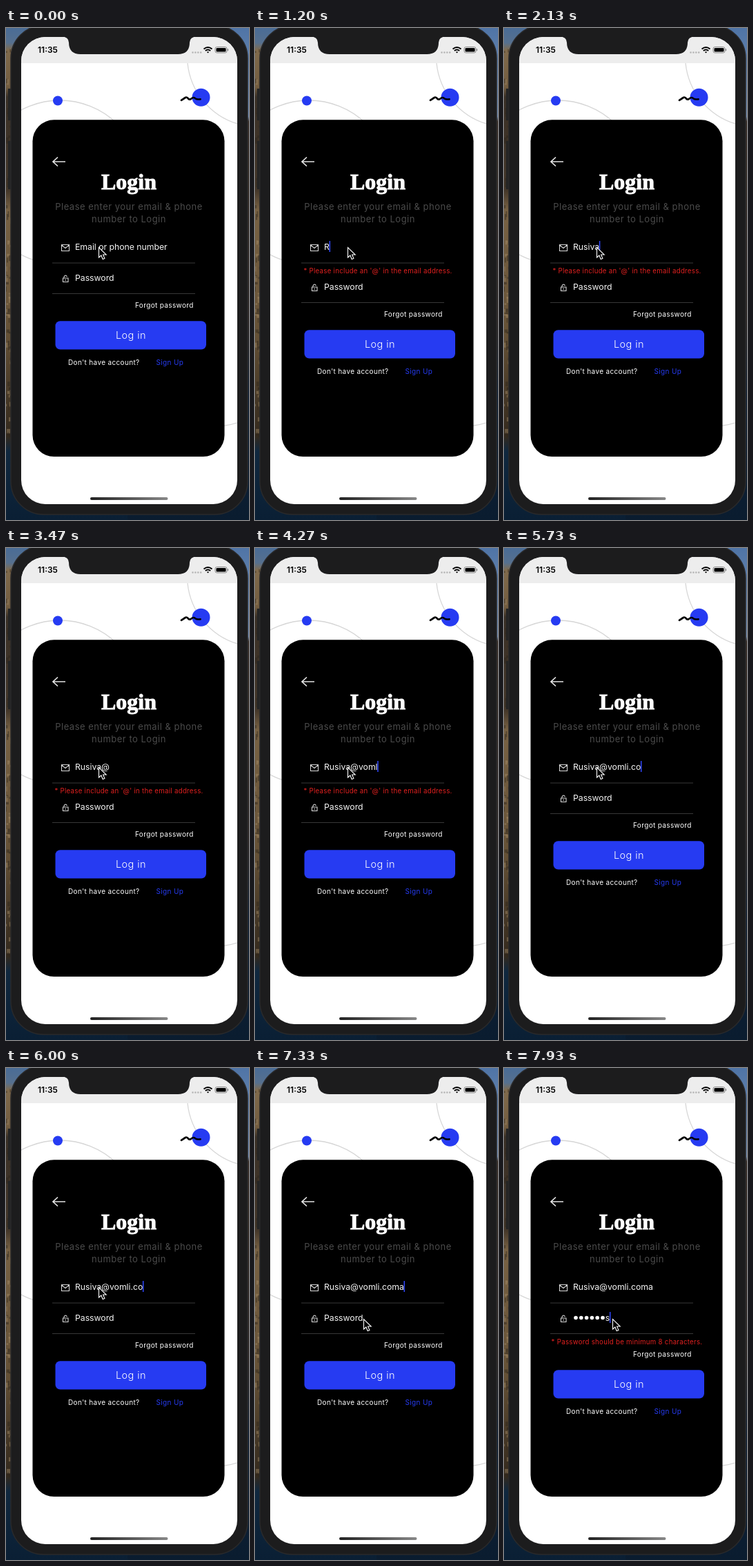
An HTML page for the animation above (8 s loop, 352 by 714 pixels).

```html
<!DOCTYPE html>
<html lang="en">
<head>
<meta charset="utf-8">
<title>Login form</title>
<style>
  html, body { margin: 0; width: 100%; height: 100%; overflow: hidden; background: #1c1c1d; }
  svg { display: block; width: 100vw; height: 100vh; }
  text { font-family: Inter, sans-serif; fill: #fff; white-space: pre; }
  .mid { text-anchor: middle; }
  .title { font: bold 32px "Liberation Serif", serif; stroke: #fff; stroke-width: .9; }
  .lead { font-size: 13px; letter-spacing: .5px; fill: #4b4b4b; }
  .field { font-size: 12.3px; letter-spacing: -.05px; fill: #f4f4f4; }
  .small { font-size: 10px; letter-spacing: .35px; }
  .error { font-size: 9.7px; letter-spacing: .27px; fill: #e0201f; }
  .button { font-size: 14.5px; font-weight: 300; letter-spacing: .4px; }
  .icon { fill: none; stroke: #d8d8d8; stroke-width: 1.1; }
  .rule { stroke: #383838; }
  .ring { fill: none; stroke: #d6d6d6; stroke-width: 1.3; }
</style>
</head>
<body>
<svg viewBox="0 0 352 714">
  <defs>
    <linearGradient id="cliff" x2="0" y2="1">
      <stop offset="0" stop-color="#4a6c96"/>
      <stop offset=".03" stop-color="#56708f"/>
      <stop offset=".045" stop-color="#806a4c"/>
      <stop offset=".12" stop-color="#735d40"/>
      <stop offset=".14" stop-color="#3a3026"/>
      <stop offset=".33" stop-color="#44372a"/>
      <stop offset=".37" stop-color="#786244"/>
      <stop offset=".62" stop-color="#655136"/>
      <stop offset=".83" stop-color="#33291d"/>
      <stop offset=".86" stop-color="#10283f"/>
      <stop offset="1" stop-color="#0a1f34"/>
    </linearGradient>
    <linearGradient id="shore" x2="0" y2="1">
      <stop offset="0" stop-color="#4f74a6"/>
      <stop offset=".18" stop-color="#7d97bb"/>
      <stop offset=".19" stop-color="#3f332b"/>
      <stop offset=".6" stop-color="#302a28"/>
      <stop offset=".75" stop-color="#10233a"/>
      <stop offset="1" stop-color="#0a1c2f"/>
    </linearGradient>
    <linearGradient id="bar">
      <stop offset="0" stop-color="#222"/>
      <stop offset="1" stop-color="#888"/>
    </linearGradient>
  </defs>

  <rect width="176" height="714" fill="url(#cliff)"/>
  <rect x="176" width="176" height="714" fill="url(#shore)"/>
  <g id="rocks"></g>

  <!-- phone -->
  <path d="M3 88h6v46H3zM3 164h6v70H3z" fill="#252525"/>
  <rect x="7" y="-4" width="343" height="710" rx="48" fill="#1c1c1d" stroke="#2a2a2b" stroke-width="1.5"/>
  <clipPath id="screen"><rect x="22" y="13" width="313" height="678" rx="35"/></clipPath>
  <g clip-path="url(#screen)">
    <rect x="22" y="13" width="313" height="678" fill="#fff"/>
    <rect x="22" y="13" width="313" height="38" fill="#ededed"/>
    <g class="ring">
      <circle cx="78" cy="224" r="119"/>
      <path d="M263 51A102.8 102.8 0 0 0 335 139"/>
      <path d="M314 577.5Q326 576 336 572.5"/>
    </g>
    <circle cx="75" cy="105.500" r="7" fill="#263bf2"/>
    <circle cx="282.500" cy="100.700" r="13" fill="#263bf2"/>
    <path d="M254 104.800L259 101.500Q262 99.500 264 102.500Q266 104.800 268.500 102.500Q272 99.500 274.500 102.500Q276.500 104 281.500 103.300" fill="none" stroke="#000" stroke-width="2.700" stroke-linecap="round"/>
  </g>
  <path d="M80 12Q91 13 91 21Q91 38 108 38H249Q266 38 266 21Q266 13 277 12Z" fill="#1c1c1d"/>

  <!-- status bar -->
  <text x="46" y="36" style="font-size:12px;font-weight:600;fill:#000">11:35</text>
  <path d="M270.500 35.500h12" stroke="#b5b5b5" stroke-width="2.600" stroke-linecap="round" stroke-dasharray="0 3.900"/>
  <g fill="none" stroke="#000" stroke-width="1.900">
    <path d="M286.500 30.500q6-5 12 0M288.800 33q3.700-3 7.400 0"/>
    <path d="M292.500 36.500l-1.700-1.700q1.700-1.100 3.400 0z" fill="#000" stroke="none"/>
  </g>
  <rect x="303" y="27.500" width="17" height="8.500" rx="2.500" fill="none" stroke="#888"/>
  <rect x="304.500" y="29" width="14" height="5.500" rx="1.300"/>
  <path d="M321.500 30.200v3" stroke="#888" stroke-width="1.200"/>

  <!-- card -->
  <rect x="38.500" y="133.300" width="278" height="488.700" rx="31"/>
  <path d="M86 194H68.500M75 187.500L68 194L75 200.500" fill="none" stroke="#e4e4e4" stroke-width="1.700"/>
  <text class="title mid" x="178" y="233.500">Login</text>
  <text class="lead mid" x="178" y="263.500">Please enter your email &amp; phone</text>
  <text class="lead mid" x="178" y="282">number to Login</text>

  <path class="icon" d="M80.500 314.500h11v9h-11zM80.500 315l5.500 4.500l5.500-4.500"/>
  <text class="field" id="email" x="100" y="322"></text>
  <path class="rule" d="M67 341h207"/>
  <text class="error mid" id="emailError" x="178" y="355.500">* Please include an '@' in the email address.</text>

  <g id="passwordRow">
    <path class="icon" d="M82.500 363h7.500v5.500h-7.500zM84 363v-2q2.300-4 4.500 0M86.200 364.700v2"/>
    <text class="field" id="password" x="100" y="366.500"></text>
    <g id="dots" fill="#fff"></g>
    <path class="rule" d="M67 385.500h207"/>
    <text class="error mid" id="passwordError" x="178" y="400.500">* Password should be minimum 8 characters.</text>
  </g>
  <g id="actions">
    <text class="small" x="187" y="406">Forgot password</text>
    <rect x="71.500" y="425.300" width="218.500" height="41.200" rx="7" fill="#263bf2"/>
    <text class="button mid" x="181" y="451">Log in</text>
    <text class="small" x="90" y="489">Don't have account?</text>
    <text class="small" x="217.500" y="489" style="fill:#263bf2">Sign Up</text>
  </g>
  <rect id="caret" width="1.500" height="16" fill="#3048ff"/>
  <rect x="122" y="681" width="112.500" height="4" rx="2" fill="url(#bar)"/>
  <path id="pointer" d="M0 0V14.500L3.400 11.500L5.700 17L8.400 15.900L6.100 10.500H10.700Z" fill="#000" stroke="#fff" stroke-width="1.100"/>
</svg>

<script>
const LOOP = 8000, SHIFT = 13, DOT_PITCH = 7.8;
const FOCUS_PASSWORD = 7400;
const EMAIL = "Rusiva@vomli.coma";
const EMAIL_KEYS = [1070, 1330, 1470, 1670, 1870, 2070, 2470, 3870, 4000, 4130, 4250, 4470, 4730, 5000, 5730, 6400, 6800];
const PASSWORD = "dasdfas";
const PASSWORD_KEYS = [7460, 7530, 7600, 7665, 7730, 7865, 7925];
const VALID_AT = EMAIL_KEYS[EMAIL.indexOf(".co") + 2];
// caret opacity as [time, value]
const CARET = [[30, 0], [270, 1], [700, 1], [930, 0], [1060, 0], [1070, 1], [2570, 1], [2800, 0],
  [2940, 0], [3130, 1], [3220, 1], [3470, 0], [3750, 0], [3870, 1], [5130, 1], [5270, 0],
  [5720, 0], [5730, 1], [6000, 1], [6130, 0], [6390, 0], [6400, 1]];

const $ = id => document.getElementById(id);
const clamp = x => Math.max(0, Math.min(1, x));
const set = (el, attrs) => { for (const k in attrs) el.setAttribute(k, attrs[k]); };
const show = (el, on) => set(el, { visibility: on ? "visible" : "hidden" });
const add = (parent, tag, attrs) => {
  const el = document.createElementNS("http://www.w3.org/2000/svg", tag);
  set(el, attrs);
  return parent.appendChild(el);
};
const typed = (keys, t) => keys.filter(k => k <= t).length;

function track(points, t) {
  const next = points.findIndex(p => p[0] > t);
  if (next < 0) return points[points.length - 1][1];
  if (next === 0) return points[0][1];
  const [t0, a] = points[next - 1], [t1, b] = points[next];
  return a + (b - a) * (t - t0) / (t1 - t0);
}

let seed = 7;
const random = () => (seed = seed * 16807 % 2147483647) / 2147483647;
for (let i = 0; i < 70; i++) {
  add($("rocks"), "rect", {
    x: random() * 7 - 1, y: 30 + random() * 560, width: 1 + random() * 4, height: 2 + random() * 7,
    fill: random() < .6 ? "#2b241c" : "#a58d68", opacity: .45
  });
}
const dots = PASSWORD_KEYS.map((_, i) =>
  add($("dots"), "circle", { cx: 104 + i * DOT_PITCH, cy: 362.5, r: 2.8 }));

function render(t) {
  const emailCount = typed(EMAIL_KEYS, t), count = typed(PASSWORD_KEYS, t);
  const emailBad = emailCount > 0 && t < VALID_AT, passwordBad = count > 0;

  $("email").textContent = emailCount ? EMAIL.slice(0, emailCount) : "Email or phone number";
  $("password").textContent = count ? PASSWORD[count - 1] : "Password";
  set($("password"), { x: 100 + Math.max(0, count - 1) * DOT_PITCH });
  dots.forEach((dot, i) => show(dot, i < count - 1));

  show($("emailError"), emailBad);
  show($("passwordError"), passwordBad);
  set($("passwordRow"), { transform: `translate(0 ${emailBad ? SHIFT : 0})` });
  set($("actions"), { transform: `translate(0 ${emailBad || passwordBad ? SHIFT : 0})` });

  const onPassword = t >= FOCUS_PASSWORD;
  const field = $(onPassword ? "password" : "email");
  const filled = onPassword ? count : emailCount;
  const end = filled ? +field.getAttribute("x") + field.getComputedTextLength() : 100;
  set($("caret"), { x: end - .3, y: onPassword ? 354 : 309, opacity: track(CARET, t) });

  const p = clamp((t - 6870) / 400), ease = p * p * (3 - 2 * p);
  set($("pointer"), { transform: `translate(${134.5 + 23 * ease} ${318.5 + 46 * ease})` });
}

const start = performance.now();
function tick() {
  render((performance.now() - start) % LOOP);
  requestAnimationFrame(tick);
}
tick();
</script>
</body>
</html>
```
